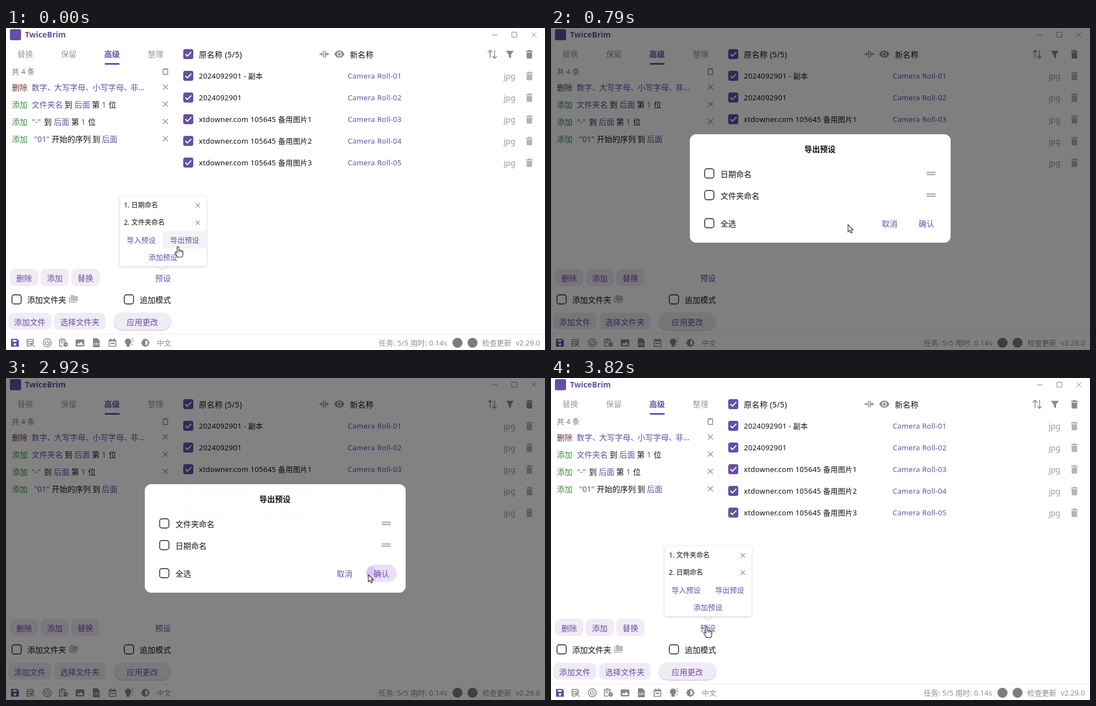
An HTML page with a canvas for the animation above (5.22 s loop, 967x579 px).

```html
<!DOCTYPE html>
<html lang="zh-CN">
<head>
<meta charset="utf-8">
<title>TwiceBrim</title>
<style>
html, body { margin: 0; width: 100%; height: 100%; overflow: hidden; background: #fff; }
canvas { display: block; width: 967px; height: 579px; }
</style>
</head>
<body>
<canvas id="stage" width="967" height="579"></canvas>
<script>
const ctx = document.getElementById('stage').getContext('2d');
const W = 967, H = 579, LOOP = 5220;
const PURPLE = '#664fa5', INK = '#111', GREY = '#8c8c8c', GREEN = '#3a8a3e', RUST = '#6a3030', TONAL = '#f1ebf5';
const FONT = '"Noto Sans", "Noto Sans CJK SC", "Noto Sans CJK", sans-serif';

// Bursts of screen updates: start, end, number of steps
const bursts = [[470, 930, 8], [1000, 1400, 6], [1540, 2000, 8], [2070, 2590, 9],
  [2870, 2990, 3], [3090, 3360, 5], [3430, 3820, 7]];

function snap(t) {
  const burst = bursts.filter(b => t >= b[0]).pop();
  if (!burst) return 0;
  const [start, end, steps] = burst;
  const dt = (end - start) / (steps - 1);
  return start + dt * Math.min(steps - 1, Math.floor((t - start + 12) / dt));
}

const ramp = (t, a, b) => Math.max(0, Math.min(1, (t - a) / (b - a)));
const smooth = (t, a, b) => { const u = ramp(t, a, b); return u * u * (3 - 2 * u); };

function text(str, x, cy, { size = 14, color = INK, bold = false, spacing = 0, align = 'left' } = {}) {
  ctx.font = `${bold ? 700 : 400} ${size}px ${FONT}`;
  ctx.letterSpacing = spacing + 'px';
  ctx.textAlign = align;
  ctx.fillStyle = color;
  ctx.fillText(str, x, Math.round(cy + size * 0.37));
}

function box(x, y, w, h, r, color) {
  ctx.fillStyle = color;
  ctx.beginPath();
  ctx.roundRect(x, y, w, h, r);
  ctx.fill();
}

function outline(x, y, w, h, r, color, width) {
  ctx.strokeStyle = color;
  ctx.lineWidth = width;
  ctx.beginPath();
  ctx.roundRect(x, y, w, h, r);
  ctx.stroke();
}

function disc(x, y, r, color) {
  ctx.fillStyle = color;
  ctx.beginPath();
  ctx.arc(x, y, r, 0, Math.PI * 2);
  ctx.fill();
}

function stroke(path, color, width, x = 0, y = 0) {
  ctx.save();
  ctx.translate(x, y);
  ctx.strokeStyle = color;
  ctx.lineWidth = width;
  ctx.stroke(new Path2D(path));
  ctx.restore();
}

function fill(path, color, x = 0, y = 0) {
  ctx.save();
  ctx.translate(x, y);
  ctx.fillStyle = color;
  ctx.fill(new Path2D(path));
  ctx.restore();
}

function withShadow(color, blur, dy, draw) {
  ctx.save();
  ctx.shadowColor = color;
  ctx.shadowBlur = blur;
  ctx.shadowOffsetY = dy;
  draw();
  ctx.restore();
}

const cross = (x, y, r = 4.5, color = GREY) => stroke(`M${-r} ${-r}L${r} ${r}M${r} ${-r}L${-r} ${r}`, color, 1.2, x, y);
const emptyCheck = (x, cy) => outline(x + 0.7, cy - 8.3, 16.6, 16.6, 4, '#1c1c1c', 1.4);

function tickedCheck(cy) {
  box(318, cy - 9, 18, 18, 3.5, PURPLE);
  stroke('M-5 0L-1.6 3.6L5.4 -3.6', '#fff', 2, 327, cy);
}

function bin(x, y, color) {
  fill('M-6 -6H-3L-2 -7.5H2L3 -6H6V-4H-6ZM-5 -3H5V6Q5 8 3 8H-3Q-5 8 -5 6Z', color, x, y);
}

function button(label, x, y, w, h, r) {
  box(x, y, w, h, r, TONAL);
  text(label, x + w / 2, y + h / 2 + 1.2, { color: PURPLE, align: 'center', spacing: 0.1 });
}

function drawRules() {
  const rule = (cy, verb, color, parts) => {
    text(verb, 10.5, cy, { color });
    for (const [str, x, dark] of parts) text(str, x, cy, { color: dark ? INK : PURPLE });
    cross(286, cy - 1);
  };
  rule(107, '删除', RUST, [['数字、', 46], ['大写字母、', 86.6], ['小写字母、', 155.2], ['非...', 223.2]]);
  rule(138, '添加', GREEN, [['文件夹名', 46], ['到', 105, 1], ['后面', 122.7], ['第', 154, 1], ['1', 171.8], ['位', 184, 1]]);
  rule(169, '添加', GREEN, [['"-"', 46.5], ['到', 68, 1], ['后面', 85.7], ['第', 117, 1], ['1', 134.8], ['位', 147, 1]]);
  rule(200, '添加', GREEN, [['"01"', 50.5], ['开始的序列', 82, 1], ['到', 155, 1], ['后面', 172]]);
}

function drawHeader() {
  box(7, 2, 20, 20, 3, PURPLE);
  text('TwiceBrim', 34, 12, { color: PURPLE, bold: true });
  stroke('M872 12.5H882M907.5 7.5H916.5V16.5H907.5ZM942.5 7.5L951.5 16.5M951.5 7.5L942.5 16.5', GREY, 1);

  ['替换', '保留', '高级', '整理'].forEach((name, i) => {
    const on = i === 2;
    text(name, 20.5 + 77.9 * i, 47, { color: on ? PURPLE : '#9a9a9a', bold: on });
  });
  box(177, 63, 27, 3, 1.5, PURPLE);
  text('共 4 条', 10.5, 78, { size: 13, color: '#757575', spacing: 0.15 });
  stroke('M-5 -4.5H5M-2 -5.5H2M-4 -4V5H4V-4', GREY, 1.5, 286, 78.5);
}

function drawFiles() {
  tickedCheck(47);
  text('原名称 (5/5)', 346, 48, { spacing: 0.25 });
  text('新名称', 617, 48, { spacing: 0.1 });
  stroke('M562 47H568M574 47H580M569.5 41V53M573 41V53', GREY, 1.7);
  fill('M565 44L568.5 47L565 50ZM577 44L573.5 47L577 50Z', GREY);
  fill('M-9 0Q-6 -6.5 0 -6.5Q6 -6.5 9 0Q6 6.5 0 6.5Q-6 6.5 -9 0Z', GREY, 598, 47);
  disc(598, 47, 4.3, '#fff');
  disc(598, 47, 2.6, GREY);
  stroke('M868.5 54V40M864.5 44L868.5 40L872.5 44M876.5 40V54.5M872.5 50.5L876.5 54.5L880.5 50.5', GREY, 1.6);
  fill('M897 41H911L906 48V54.5L902 52V48Z', GREY);
  bin(939, 47, GREY);

  ['2024092901 - 副本', '2024092901', ...[1, 2, 3].map(n => 'xtdowner.com 105645 备用图片' + n)].forEach((name, i) => {
    const cy = 86 + 39 * i;
    tickedCheck(cy);
    text(name, 346, cy, { size: 13, spacing: 0.25 });
    text('Camera Roll-0' + (i + 1), 613, cy, { size: 13, color: PURPLE, spacing: 0.3 });
    text('jpg', 893, cy + 1, { color: '#9b9b9b' });
    bin(939, cy, '#b5b5b5');
  });
}

function drawFooter() {
  ['删除', '添加', '替换'].forEach((name, i) => button(name, 7 + 55 * i, 433, 51, 31, 9));
  text('预设', 267.5, 450, { color: PURPLE, spacing: 0.1 });
  emptyCheck(10, 488);
  text('添加文件夹', 38, 489);
  fill('M113 483H115V492H127V494H113ZM116 480H121L123 482H129V491H116Z', '#bdbdbd');
  emptyCheck(211.5, 488);
  text('追加模式', 240, 489);
  button('添加文件', 4, 512, 77.5, 30.5, 9);
  button('选择文件夹', 86.5, 512, 92, 30.5, 9);
  withShadow('rgba(0,0,0,.32)', 2.5, 1, () => box(194, 512, 101.5, 30.5, 15, TONAL));
  button('应用更改', 194, 512, 101.5, 30.5, 15);

  box(0, 550, W, 1, 0, '#eeeeee');
  const y = 566, dark = '#858585';
  fill('M-7 -7H4L7 -4V7H-7Z', PURPLE, 16, y);
  box(12, 561, 7, 3, 0, '#fff');
  disc(16, 569, 2.3, '#fff');
  stroke('M-6 -6H5M-6 -2H5M-6 2H1M-6 6H0M-6 -6V6M5 -6V0', dark, 1.5, 44, y);
  stroke('M1 1L7 7M1 6V1H6', dark, 1.6, 44, y);
  outline(66.8, 558.8, 14.4, 14.4, 7.2, dark, 1.5);
  stroke('M-2.4 -2.6A3.6 3.6 0 1 0 2.4 -2.6M0 -4.5V0', dark, 1.5, 74, y);
  stroke('M-6 -6H4V0M-6 -6V6H0M-4 -3H2M-4 0H0M-3 -7H1', dark, 1.6, 102, y);
  disc(107, 569, 4, dark);
  stroke('M107 567V569.5H109', '#fff', 1);
  box(125, 560, 15.5, 12.5, 1.5, dark);
  fill('M-6 4L-3 0L-1 2L2 -2L6 4Z', '#fff', 133, y);
  fill('M-6 -8H2L6 -4V8H-6Z', dark, 162, y);
  text('CSV', 162, 568, { size: 5, color: '#fff', bold: true, align: 'center' });
  outline(185, 561, 12, 11.5, 1, dark, 1.5);
  stroke('M185 562.5H197M188 558.5V562M194 558.5V562M187.5 567H194.5', dark, 2);
  disc(219, 564, 5.7, dark);
  box(216, 568, 6, 5, 1, dark);
  stroke('M225 560L228 558M226 563H229M224.5 568L227 570', dark, 1.3);
  fill('M0 -8L2.5 -5.5H5.5V-2.5L8 0L5.5 2.5V5.5H2.5L0 8L-2.5 5.5H-5.5V2.5L-8 0L-5.5 -2.5V-5.5H-2.5Z', dark, 250, y);
  fill('M0 -4A4 4 0 0 1 0 4Z', '#fff', 250, y);

  const note = { size: 13, color: GREY };
  text('中文', 270.5, y, note);
  text('任务: 5/5 用时: 0.14s', 668.5, y, { ...note, spacing: 0.13 });
  disc(810, y, 9, '#7c7c7c');
  disc(837, y, 9, '#7c7c7c');
  text('检查更新', 854.5, y, note);
  text('v2.29.0', 914.5, y, note);
}

function drawPopup(alpha, names, hover, press) {
  ctx.save();
  ctx.globalAlpha = alpha;
  withShadow('rgba(0,0,0,.2)', 5, 1, () => {
    fill('M274 427H289L281.5 434Z', '#fff');
    box(204, 302.5, 155.5, 125.5, 4, '#fff');
  });
  box(204, 302.5, 155.5, 125.5, 4, '#fff');
  if (hover) box(281, 365, 78, 31.5, 0, '#f3f3f3');
  if (press) box(282, 366, 69, 30.5, 8, 'rgba(0,0,0,.09)');
  names.forEach((name, i) => {
    text(`${i + 1}. ${name}`, 211.5, 319 + 31 * i, { size: 12 });
    cross(344, 319 + 31 * i, 3.8);
  });
  const action = { size: 13, color: PURPLE };
  text('导入预设', 216.5, 381.5, action);
  text('导出预设', 294.5, 381.5, action);
  text('添加预设', 255.5, 412.5, action);
  ctx.restore();
}

function drawPreset(name, cy) {
  emptyCheck(275, cy);
  text(name, 304, cy + 1);
  stroke('M674 -2H690M674 2H690', '#9e9e9e', 2, 0, cy);
}

function drawDialog(t, alpha) {
  ctx.save();
  // The scrim leaves the dialog's own area undimmed, so both cross-fade cleanly
  ctx.fillStyle = `rgba(0,0,0,${0.5 * alpha})`;
  ctx.beginPath();
  ctx.rect(0, 0, W, H);
  ctx.roundRect(249, 191, 468, 195, 12);
  ctx.fill('evenodd');
  ctx.globalAlpha = alpha;
  box(249, 191, 468, 195, 12, '#fff');
  text('导出预设', 482.5, 218, { bold: true, align: 'center' });

  drawPreset('日期命名', 261.5 + 39 * smooth(t, 1640, 1890));
  const cardY = 300.5 - 1.5 * ramp(t, 1400, 1540) - 26 * ramp(t, 1540, 1870) - 11.5 * smooth(t, 1870, 2000);
  const lift = ramp(t, 1100, 1330) * (1 - ramp(t, 1930, 2070));
  if (lift > 0) {
    withShadow(`rgba(0,0,0,${0.36 * lift})`, 4, 1.5, () => box(264.5, cardY - 19.5, 437, 39, 3, '#fff'));
  }
  drawPreset('文件夹命名', cardY);

  emptyCheck(275, 351);
  text('全选', 304, 352);
  const hover = ramp(t, 2450, 2580);
  if (hover > 0) {
    ctx.save();
    ctx.beginPath();
    ctx.roundRect(646.5, 335.5, 54.5, 31, 15.5);
    ctx.clip();
    box(646, 335, 56, 32, 0, `rgba(236,223,252,${hover})`);
    if (t >= 2870) disc(650, 353, 8 + 8 * ramp(t, 2870, 2930) + 26 * ramp(t, 2930, 3050), 'rgba(208,178,247,.55)');
    ctx.restore();
  }
  text('取消', 593.5, 352, { color: PURPLE });
  text('确认', 659.5, 352, { color: PURPLE });
  ctx.restore();
}

// Pointer tip over time: ms, x, y
const route = [[0, 308.5, 393.5], [602, 308.5, 393.5], [930, 683, 327], [1000, 683, 318], [1160, 683, 292],
  [1400, 683, 291], [1540, 683, 281], [1870, 683, 254], [2070, 683, 254], [2200, 677.5, 299.5],
  [2590, 651, 355], [2870, 650, 353.5], [2930, 650, 353.5], [3090, 638, 355], [3360, 290, 474],
  [3430, 284, 474], [3560, 279.5, 448], [LOOP, 279.5, 448]];

function pointerAt(t) {
  const i = Math.max(1, route.findIndex(p => p[0] >= t));
  const [t0, x0, y0] = route[i - 1], [t1, x1, y1] = route[i];
  const u = ramp(t, t0, t1);
  return [x0 + (x1 - x0) * u, y0 + (y1 - y0) * u];
}

const HAND = 'M-1.6 11V1Q-1.6 -.4 0 -.4Q1.6 -.4 1.6 1V6Q3.4 4.8 4.4 6.5Q6 5.6 6.9 7.3Q9 6.8 9 9V13Q9 15 7.2 18.5H-1Q-2 15 -5 11.8Q-6 9.6 -4.2 9.2Q-2.7 9.4 -1.6 11Z';
const ARROW = 'M0 0V13L3 10.3L5.2 15L7.4 14L5.3 9.4H9Z';

function drawPointer(t) {
  const [x, y] = pointerAt(t);
  if (t >= 1080 && t < 1900) disc(x - 0.5, y + 1, 11.3, 'rgba(253,240,50,.82)');
  const hand = t < 640 || (t >= 930 && t < 2100) || t >= 3490;
  const shape = hand ? HAND : ARROW;
  fill(shape, '#fff', x, y);
  stroke(shape, '#222', 1.1, x, y);
  if (hand) stroke('M1.6 6V9.5M4.4 6.8V9.8M6.9 7.5V10', '#222', 0.9, x, y);
}

function render(t) {
  ctx.fillStyle = '#fff';
  ctx.fillRect(0, 0, W, H);
  drawHeader();
  drawRules();
  drawFiles();
  drawFooter();

  const names = ['日期命名', '文件夹命名'];
  if (t < 740) drawPopup(1 - ramp(t, 650, 740), names, true, t >= 470);
  const opened = ramp(t, 3540, 3720);
  if (opened > 0) drawPopup(opened, names.reverse(), false, false);

  const shown = ramp(t, 535, 636) * (1 - ramp(t, 2928, 3050));
  if (shown > 0) drawDialog(t, shown);
  drawPointer(t);
}

function tick() {
  render(snap(performance.now() % LOOP));
  requestAnimationFrame(tick);
}
tick();
</script>
</body>
</html>
```
